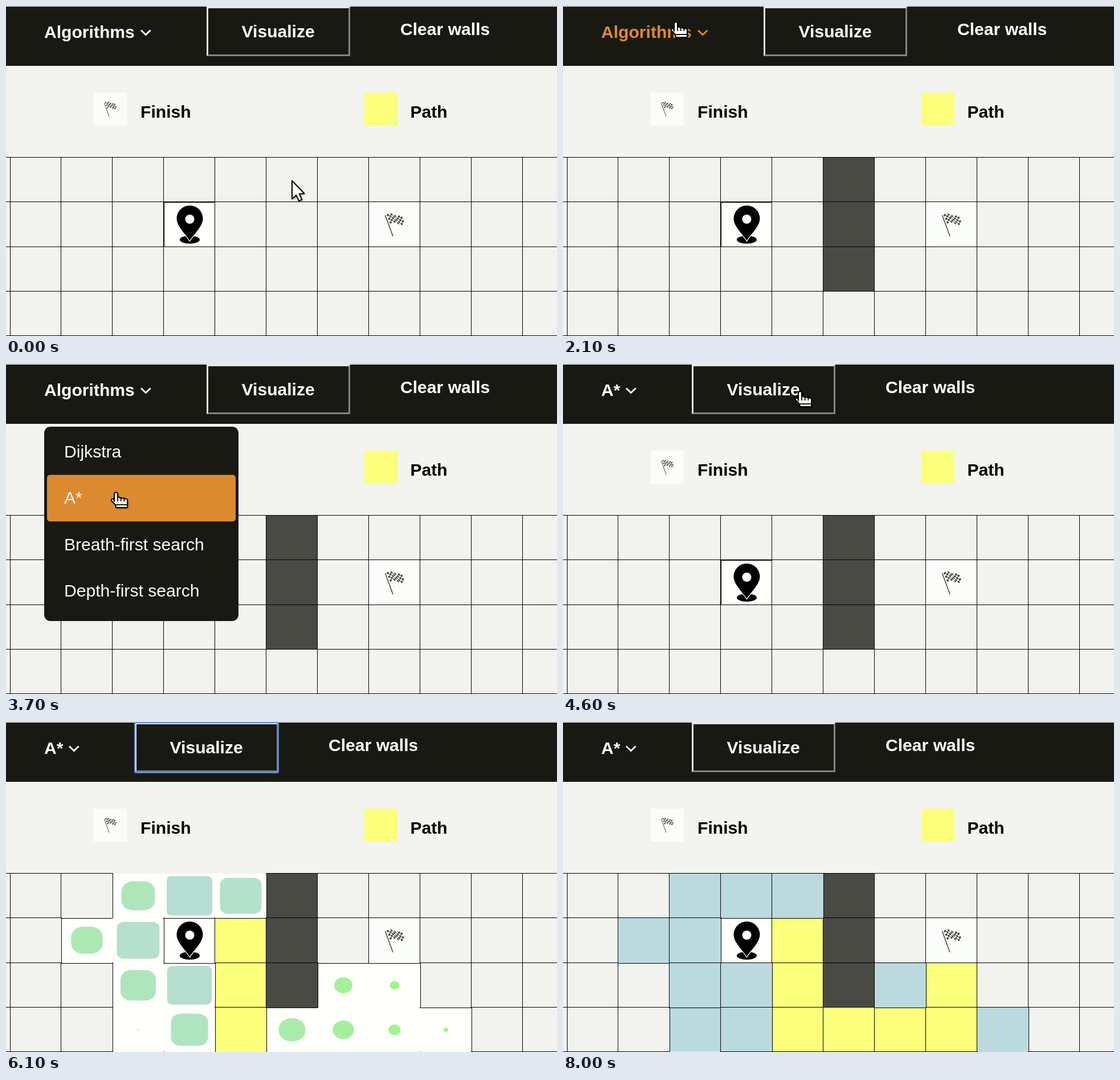
These frames come from a looping animation (967x579 px, 8100 ms). An HTML page with a canvas:

```html
<!DOCTYPE html>
<html lang="en">
<head>
<meta charset="utf-8">
<title>Pathfinding visualizer</title>
<style>
html, body { margin: 0; width: 100%; height: 100%; overflow: hidden; background: #f3f3f0; }
canvas { display: block; }
</style>
</head>
<body>
<canvas id="stage" width="967" height="579"></canvas>
<script>
const ctx = document.getElementById('stage').getContext('2d');
const LOOP = 8100, TICK = 100, GROW = 2000;
const SEARCH = 4862, VISIT = 52, TRACE = 40;
const DARK = '#191914', PAPER = '#f3f3f0', CELL = '#f2f2ef', WHITE = '#fffffc';
const WALL = '#4a4a45', PATH = '#fbff7a', ORANGE = '#dc8a2f', PALE = '#fbfdfa';
const DONE = [186, 218, 223], FRESH = [148, 255, 108];
const FONT = '30.1px "Liberation Sans", Arial, sans-serif';
const MENU = ['Dijkstra', 'A*', 'Breath-first search', 'Depth-first search'];
const START = { c: 3, r: 1 }, FINISH = { c: 7, r: 1 };
const WALL_COL = 5, PRESSES = [600, 1000, 1500], PRESS = 200;

// each move: begins, ends, x, y
const MOVES = [
  [0, 0, 501, 305], [700, 800, 505, 381], [1100, 1300, 508, 458],
  [1500, 2100, 198, 27], [2500, 2900, 195, 180], [3500, 3700, 193, 224],
  [4000, 4300, 415, 96], [4400, 4600, 416, 47], [4800, 5100, 420, -60]
];

const key = n => n.c + ',' + n.r;
const same = (a, b) => a.c === b.c && a.r === b.r;
const isWall = n => n.c === WALL_COL && n.r < PRESSES.length;
const colX = c => Math.floor(7 + 89.9 * c);
const rowY = r => Math.round(265 + 78.25 * r);

// A*: ties go to the lower row, then to the right
function search() {
  const visitAt = new Map(), routeAt = new Map(), open = [{ ...START, g: 0, f: 0 }];
  for (;;) {
    open.sort((a, b) => a.f - b.f || b.r - a.r || b.c - a.c);
    const node = open.shift();
    for (const [dc, dr] of [[0, -1], [0, 1], [1, 0], [-1, 0]]) {
      const next = { c: node.c + dc, r: node.r + dr, g: node.g + 1, from: node };
      if (same(next, FINISH)) {
        const begin = SEARCH + (visitAt.size - 1) * VISIT;
        for (let n = node; n.from; n = n.from) routeAt.set(key(n), begin + (n.g - 1) * TRACE);
        return { visitAt, routeAt };
      }
      if (next.r < 0 || isWall(next) || same(next, START) || visitAt.has(key(next))) continue;
      visitAt.set(key(next), SEARCH + visitAt.size * VISIT);
      next.f = next.g + Math.abs(next.c - FINISH.c) + Math.abs(next.r - FINISH.r);
      open.push(next);
    }
  }
}
const { visitAt, routeAt } = search();

function rect(x, y, w, h, color) {
  ctx.fillStyle = color;
  ctx.fillRect(x, y, w, h);
}
function text(str, x, y, color, bold = true) {
  ctx.font = (bold ? 'bold ' : '') + FONT;
  ctx.fillStyle = color;
  ctx.fillText(str, x, y);
}
function round(x, y, w, h, r, color) {
  ctx.beginPath();
  ctx.roundRect(x, y, w, h, r);
  ctx.fillStyle = color;
  ctx.fill();
}
function poly(points, close = true) {
  ctx.beginPath();
  points.forEach(([x, y]) => ctx.lineTo(x, y));
  if (close) ctx.closePath();
}
function stroke(color, width) {
  ctx.strokeStyle = color;
  ctx.lineWidth = width;
  ctx.stroke();
}

// cubic-bezier(.25, .1, .25, 1)
function ease(p) {
  if (p <= 0 || p >= 1) return p <= 0 ? 0 : 1;
  const bez = (a, b, u) => 3 * a * u * (1 - u) ** 2 + 3 * b * u * u * (1 - u) + u ** 3;
  let lo = 0, hi = 1;
  for (let i = 0; i < 24; i++) {
    const mid = (lo + hi) / 2;
    if (bez(.25, .25, mid) < p) lo = mid; else hi = mid;
  }
  return bez(.1, 1, lo);
}

const onRoute = (n, t) => t >= routeAt.get(key(n));
const searched = (n, t) => t >= visitAt.get(key(n)) && !onRoute(n, t);
const growing = (n, t) => searched(n, t) && t < visitAt.get(key(n)) + GROW;

function cellColor(n, t) {
  if (isWall(n)) {
    const age = t - PRESSES[n.r];
    return age < 0 ? CELL : age < PRESS ? WHITE : WALL;
  }
  if (same(n, START)) return WHITE;
  if (same(n, FINISH)) return PALE;
  if (onRoute(n, t)) return PATH;
  if (growing(n, t)) return WHITE;
  return searched(n, t) ? `rgb(${DONE})` : CELL;
}

function drawCell(n, t) {
  const x = colX(n.c) + 1, y = rowY(n.r) + 1;
  rect(x, y, colX(n.c + 1) + 1 - x, rowY(n.r + 1) + 1 - y, cellColor(n, t));
  if (!growing(n, t)) return;
  const f = ease((t - visitAt.get(key(n))) / GROW);
  const w = 89 * f, h = 77 * f, q = Math.min(.5, 1 - f);
  const color = FRESH.map((v, i) => Math.round(v + (DONE[i] - v) * f));
  round(x + 45 - w / 2, y + 39 - h / 2, w, h, { x: w * q, y: h * q }, `rgb(${color})`);
}

// Line between cell a and the cell b after it: hidden, or pushed one pixel on
function drawEdge(a, b, t, vertical) {
  const top = b.r === 0 && !vertical;
  if (growing(b, t) && (top || growing(a, t))) return;
  const push = growing(b, t) || (searched(a, t) && !searched(b, t)) ? 1 : 0;
  const x = colX(b.c), y = rowY(b.r);
  if (vertical) rect(x + push, y, 1, rowY(b.r + 1) - y + 1, '#000');
  else rect(x, y + push, colX(b.c + 1) - x + 1, 1, '#000');
}

function eachCell(visit) {
  for (let r = 0; r < 5; r++)
    for (let c = -1; c < 11; c++) visit({ c, r });
}

function drawGrid(t) {
  eachCell(n => drawCell(n, t));
  eachCell(n => {
    drawEdge({ c: n.c, r: n.r - 1 }, n, t, false);
    drawEdge({ c: n.c - 1, r: n.r }, n, t, true);
  });
  if (t < SEARCH) {
    rect(277, 344, 89, 1, '#000');
    rect(277, 344, 1, 78, '#000');
  }
  drawPin();
  drawFlag(665, 364, 1);
}

function drawPin() {
  ctx.fillStyle = '#000';
  ctx.beginPath();
  ctx.ellipse(322.5, 410, 17.5, 7, 0, 0, 7);
  ctx.fill();
  ctx.beginPath();
  ctx.moveTo(322.5, 411.5);
  ctx.bezierCurveTo(316, 401, 299.5, 387, 299.5, 373);
  ctx.arc(322.5, 373, 23, Math.PI, 0);
  ctx.bezierCurveTo(345.5, 387, 329, 401, 322.5, 411.5);
  ctx.closePath();
  stroke(WHITE, 2.4);
  ctx.fill();
  ctx.beginPath();
  ctx.arc(322.5, 374, 8, 0, 7);
  ctx.fillStyle = WHITE;
  ctx.fill();
}

function drawFlag(x, y, s) {
  const ink = '#444440', cols = 8, rows = 5;
  const at = (i, j) => {
    const u = i / cols, v = j / rows;
    return [3 + 26 * u + 6 * v, 2 + 16 * v - 2.2 * Math.sin(u * 6.3)];
  };
  ctx.save();
  ctx.translate(x, y);
  ctx.scale(s, s);
  poly([[.5, 3], [14, 40]], false);
  stroke(ink, 1.5);
  ctx.fillStyle = ink;
  for (let i = 0; i < cols; i++)
    for (let j = 0; j < rows; j++) {
      if ((i + j) % 2) continue;
      poly([at(i, j), at(i + 1, j), at(i + 1, j + 1), at(i, j + 1)]);
      ctx.fill();
    }
  ctx.restore();
}

function drawButton(x, focused) {
  const y = 1, w = 252, h = 87, b = 3;
  rect(x, y, w, h, '#e0e4dd');
  poly([[x + w, y], [x + w, y + h], [x, y + h], [x + b, y + h - b], [x + w - b, y + b]]);
  ctx.fillStyle = '#82847f';
  ctx.fill();
  rect(x + b, y + b, w - 2 * b, h - 2 * b, DARK);
  if (focused) {
    ctx.beginPath();
    ctx.roundRect(x, y, w, h + 1, 2);
    stroke('#5f8cd4', 2);
  }
  text('Visualize', x + 61.5, 54.5, '#fff');
}

function drawHeader(t, cur) {
  const chosen = t >= 4000, dx = chosen ? -126 : 0;
  const tint = cur.hand && cur.y < 75 && cur.x < 260 ? ORANGE : '#fff';
  rect(0, 1, 967, 104, DARK);
  text(chosen ? 'A*' : 'Algorithms', 67, 55.5, tint);
  poly([[237 + dx, 42.5], [245.3 + dx, 50.5], [253.6 + dx, 42.5]], false);
  stroke(tint, 3);
  drawButton(352 + dx, t >= 4800 && t < 7500);
  text('Clear walls', 692 + dx, 51, '#fff');
}

function drawLegend() {
  rect(154, 152, 58, 58, PALE);
  drawFlag(172, 168, .65);
  text('Finish', 236, 195.5, '#000');
  rect(629, 152, 58, 58, PATH);
  text('Path', 709.5, 195.5, '#000');
}

function drawMenu(cur) {
  const step = 81.6;
  round(67, 110, 341, 341, 11, DARK);
  MENU.forEach((label, i) => {
    const y = 113 + step * i;
    if (cur.y >= y && cur.y < y + step) round(72, y, 331, step, 5, ORANGE);
    text(label, 102, y + 50.5, '#fbfbf8', false);
  });
}

function drawPointer(outline) {
  outline();
  ctx.fillStyle = '#fff';
  ctx.shadowColor = 'rgba(0,0,0,.4)';
  ctx.shadowBlur = 3;
  ctx.shadowOffsetX = ctx.shadowOffsetY = 2;
  ctx.fill();
  ctx.shadowColor = 'transparent';
  stroke('#000', 2);
}

function arrow() {
  poly([[1, 1.5], [1, 33.5], [8.3, 27], [13, 37], [18.3, 34.6], [13.8, 24.8], [22.5, 24]]);
}

function hand() {
  ctx.beginPath();
  ctx.moveTo(-3, 17);
  ctx.lineTo(-3, 3);
  ctx.quadraticCurveTo(0, -1, 3, 3);
  ctx.lineTo(3, 10);
  for (let i = 1; i <= 3; i++) ctx.quadraticCurveTo(6 * i, 8 + i, 3 + 5.7 * i, 10 + 1.5 * i);
  ctx.lineTo(20, 28);
  ctx.lineTo(0, 28);
  ctx.lineTo(-1, 23);
  ctx.lineTo(-8, 16);
  ctx.quadraticCurveTo(-9, 11, -4, 13);
  ctx.closePath();
}

function drawHand() {
  drawPointer(hand);
  for (let i = 0; i < 3; i++) {
    poly([[3 + 5.7 * i, 10], [3 + 5.7 * i, 17]], false);
    stroke('#000', 1.8);
  }
  poly([[0, 23], [20, 23]], false);
  stroke('#000', 1.8);
}

function cursorAt(t, menuOpen) {
  let [, , x, y] = MOVES[0];
  for (const [from, to, nx, ny] of MOVES) {
    if (t <= from) break;
    const p = Math.min(1, (t - from) / (to - from)), k = p * p * (3 - 2 * p);
    x += (nx - x) * k;
    y += (ny - y) * k;
  }
  return { x, y, hand: y < 85 || (menuOpen && y > 112) };
}

function draw(t) {
  const menuOpen = t >= 2500 && t < 4000, cur = cursorAt(t, menuOpen);
  rect(0, 0, 967, 579, PAPER);
  drawLegend();
  drawGrid(t);
  drawHeader(t, cur);
  if (menuOpen) drawMenu(cur);
  ctx.save();
  ctx.translate(cur.x, cur.y);
  ctx.lineJoin = 'round';
  if (cur.hand) drawHand(); else drawPointer(arrow);
  ctx.restore();
}

const began = performance.now();
function frame() {
  const t = (performance.now() - began) % LOOP;
  draw(Math.floor(t / TICK) * TICK);
  requestAnimationFrame(frame);
}
frame();
</script>
</body>
</html>
```
